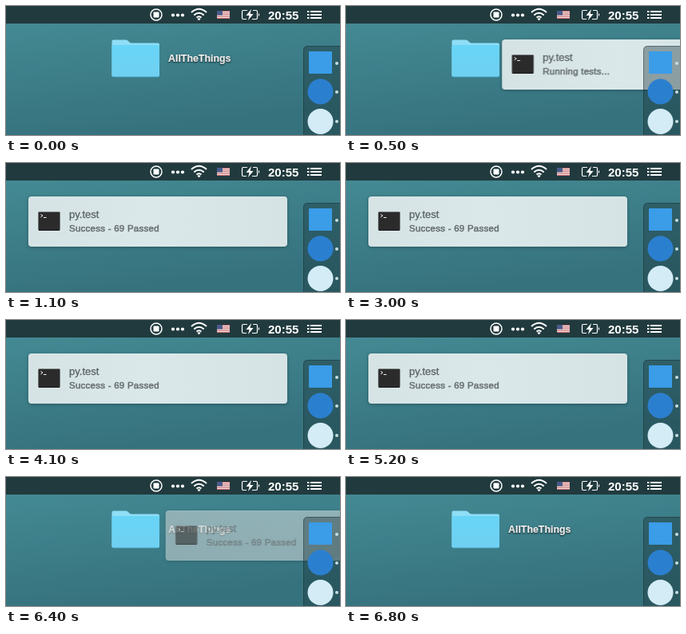
An HTML page that plays this animation: 418 px wide and 162 px high, repeating every 7100 ms.

```html
<!DOCTYPE html>
<html lang="en">
<head>
<meta charset="utf-8">
<title>Test notification</title>
<style>
  html, body { margin: 0; width: 100%; height: 100%; overflow: hidden; background: #3b7b86; }
  svg { display: block; width: 418px; height: 162px; }
  text { font-family: "Liberation Sans", Arial, sans-serif; }
  .clock { font-size: 15px; font-weight: bold; fill: #fff; }
  .label { font-size: 12.4px; font-weight: bold; fill: #fff; stroke: #fff; stroke-width: .2px; text-shadow: 0 1px 2px rgba(0, 0, 0, .75); }
  .title { font-size: 13px; fill: #5b6365; stroke: #5b6365; stroke-width: .3px; }
  .status { font-size: 11.5px; letter-spacing: .25px; fill: #687072; stroke: #687072; stroke-width: .55px; }
  #banner { filter: drop-shadow(0 1px 2px rgba(0, 0, 0, .28)); }
</style>
</head>
<body>
<svg viewBox="0 0 418 162">
  <defs>
    <linearGradient id="desk" x1="0" y1="0" x2=".3" y2="1">
      <stop offset="0" stop-color="#458d96"/>
      <stop offset="1" stop-color="#36727e"/>
    </linearGradient>
    <linearGradient id="front" x1="0" y1="0" x2="0" y2="1">
      <stop offset="0" stop-color="#68d5f7"/>
      <stop offset="1" stop-color="#70d0f1"/>
    </linearGradient>
    <linearGradient id="paper">
      <stop offset="0" stop-color="#d6e3e5"/>
      <stop offset=".45" stop-color="#dae8ea"/>
      <stop offset="1" stop-color="#d6e3e5"/>
    </linearGradient>
  </defs>

  <rect width="418" height="162" fill="url(#desk)"/>

  <g id="folder">
    <path d="M132.500 88V44.500Q132.500 42.500 134.500 42.500H150Q152 42.500 153.500 44.500T157 46.500H190Q192 46.500 192 48.500V88Z" fill="#8edef6"/>
    <rect x="132.500" y="49" width="59.500" height="40" rx="2" fill="url(#front)"/>
    <path d="M134 89H191" stroke="#4aa6c6" stroke-width=".8"/>
  </g>
  <text class="label" x="203" y="70">AllTheThings</text>

  <g id="banner">
    <rect y="42" width="324" height="63" rx="4" fill="url(#paper)"/>
    <rect x="12.500" y="61.500" width="27" height="23" rx="1" fill="#2b2b2b" stroke="#6b6e6f" stroke-width=".8"/>
    <path d="M13 84.500H39" stroke="#191919"/>
    <path d="M15.500 64.500L18 66.200L15.500 68M19 68.500H22.500" fill="none" stroke="#fff"/>
    <text class="title" x="51" y="69">py.test</text>
    <text class="status" id="running" x="51" y="86">Running tests...</text>
    <text class="status" id="passed" x="51" y="86">Success - 69 Passed</text>
  </g>

  <g id="dock">
    <path d="M372.500 163V55.500Q372.500 50.500 377.500 50.500H419V163Z" fill="rgba(25,50,55,.4)" stroke="rgba(20,40,45,.55)"/>
    <rect x="379" y="57" width="29" height="28" rx="1" fill="#3b9ce8"/>
    <circle cx="393.500" cy="107.500" r="16" fill="#2b7fcf"/>
    <circle cx="393.500" cy="145" r="16" fill="#d3ecf6"/>
    <g fill="#c9dde0">
      <circle cx="414" cy="72" r="2"/>
      <circle cx="414" cy="108" r="2"/>
      <circle cx="414" cy="145" r="2"/>
    </g>
  </g>

  <g id="menubar">
    <rect width="418" height="22" fill="#213a3e"/>
    <g fill="none" stroke="#fff">
      <circle cx="188" cy="11" r="7" stroke-width="1.500"/>
      <path d="M232 8Q241.500 -.5 251 8M235.300 11.500Q241.500 6 247.700 11.500M238.500 14.500Q241.500 12 244.500 14.500" stroke-width="2"/>
      <path d="M302 5.500H297Q295.500 5.500 295.500 7V15Q295.500 16.500 297 16.500H301M309 5.500H313Q314.500 5.500 314.500 7V15Q314.500 16.500 313 16.500H308" stroke-width="1.200"/>
      <path d="M381 7H395M381 11H395M381 15H395M377 7H379.500M377 11H379.500M377 15H379.500" stroke-width="1.800"/>
    </g>
    <g fill="#fff">
      <rect x="184.500" y="7.500" width="7" height="7" rx="1"/>
      <circle cx="209" cy="11.500" r="2.100"/>
      <circle cx="215" cy="11.500" r="2.100"/>
      <circle cx="221" cy="11.500" r="2.100"/>
      <path d="M239.300 16L241.500 18.200L243.700 16Q241.500 14.300 239.300 16Z"/>
      <path d="M307 4L300.500 12H304.500L303 18L309.500 10H305.500Z"/>
      <path d="M316 9Q318.500 11 316 13Z"/>
    </g>
    <rect x="264" y="6" width="16" height="10" fill="#f0e6e4"/>
    <path d="M264 6.500H280M264 8.800H280M264 11H280M264 13.300H280M264 15.500H280" stroke="#c9656a"/>
    <rect x="264" y="6" width="7" height="5.500" fill="#495b8b"/>
    <text class="clock" x="328" y="16.500">20:55</text>
  </g>
</svg>
<script>
  const LOOP = 7100, STEP = 100;
  const HOME = 28, TRAVEL = 390, SLIDE = 550;
  const ENTER_AT = 200, PASSED_AT = 1100, EXIT_AT = 6146;

  const easeInOut = p => 0.5 - 0.5 * Math.cos(Math.PI * p);
  const slide = (t, start) => easeInOut(Math.min(1, Math.max(0, (t - start) / SLIDE)));

  // Each part of the banner fades on its own, so the opacity is inherited.
  function bannerAt(t) {
    const entered = slide(t, ENTER_AT), exited = slide(t, EXIT_AT);
    const x = HOME + TRAVEL * (1 - entered + exited);
    const alpha = entered > 0 ? 1 - exited : 0;
    return { transform: `translateX(${x.toFixed(1)}px)`, fillOpacity: alpha, strokeOpacity: alpha };
  }

  // Hold each pose for one step, as the screen recording rate does.
  function play(id, poseAt) {
    const frames = [];
    for (let t = 0; t < LOOP; t += STEP) {
      frames.push({ ...poseAt(t), offset: Math.max(0, t - 0.5) / LOOP, easing: 'steps(1, end)' });
    }
    frames.push({ ...poseAt(LOOP - STEP), offset: 1 });
    document.getElementById(id).animate(frames, { duration: LOOP, iterations: Infinity });
  }

  play('banner', bannerAt);
  play('running', t => ({ opacity: t < PASSED_AT ? 1 : 0 }));
  play('passed', t => ({ opacity: t < PASSED_AT ? 0 : 1 }));
</script>
</body>
</html>
```
